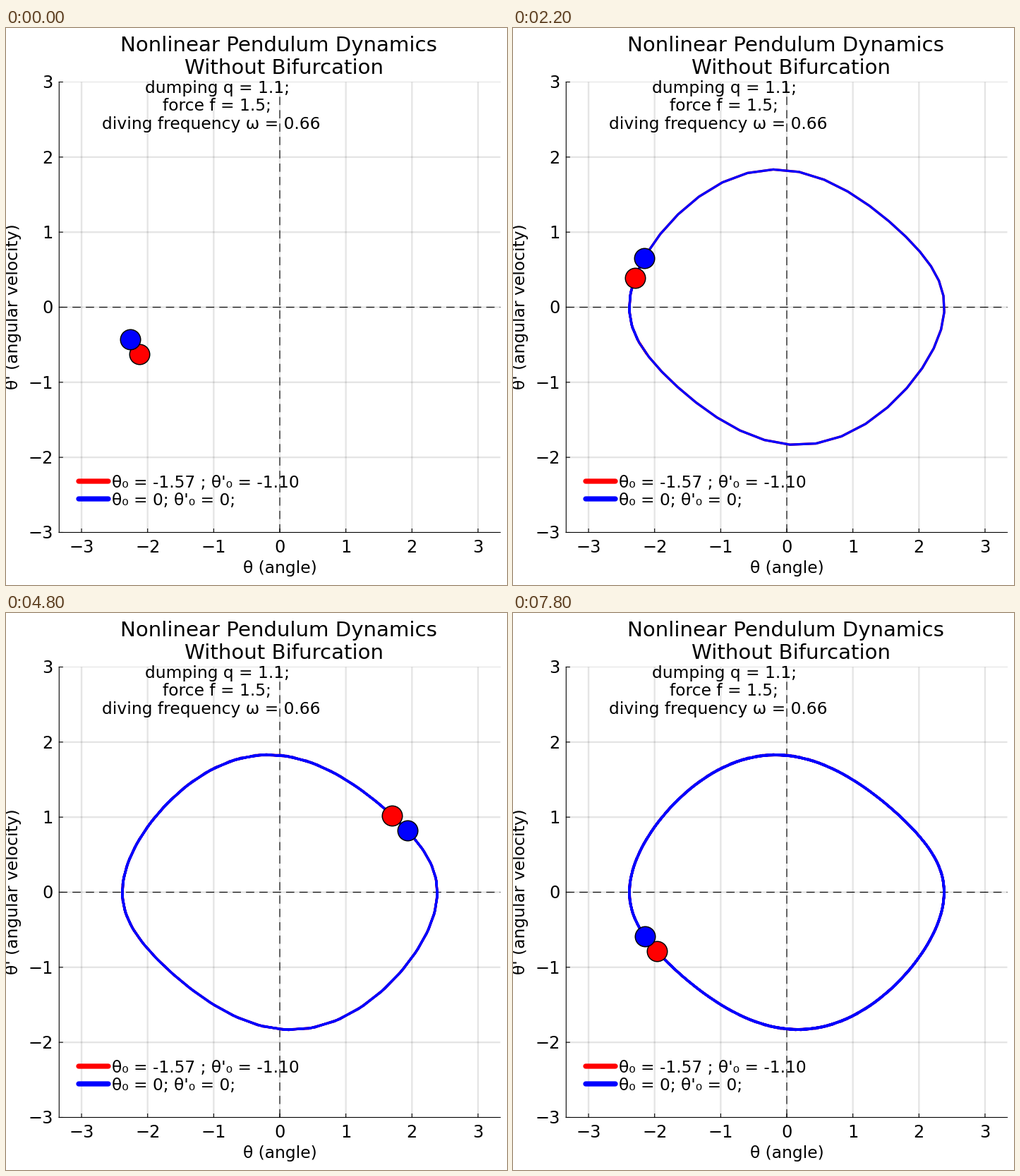
A matplotlib script for the animation above (8000 ms loop, 710x789 px).

```python
import numpy as np
import matplotlib.pyplot as plt
from matplotlib.animation import FuncAnimation

W, H, DPI = 710, 789, 100
PX = 72 / DPI
FRAMES, INTERVAL, STEPS = 40, 200, 4

# Driven damped pendulum
Q, F, OMEGA = 1.1, 1.5, 0.66
PERIOD = 2 * np.pi / OMEGA
N = 1000


def slope(t, s):
    return np.array([s[1], -s[1] / Q - np.sin(s[0]) + F * np.cos(OMEGA * t)])


def limit_cycle(laps=12):
    """One period of the settled motion, sampled at N + 1 times."""
    h = PERIOD / N
    s = np.array([-0.07, 1.83])
    path = []
    for k in range(laps * N + 1):
        if k >= (laps - 1) * N:
            path.append(s)
        t = k * h
        a = slope(t, s)
        b = slope(t + h / 2, s + h / 2 * a)
        c = slope(t + h / 2, s + h / 2 * b)
        d = slope(t + h, s + h * c)
        s = s + h / 6 * (a + 2 * b + 2 * c + d)
    path = np.array(path)
    path[:, 0] -= 2 * np.pi * np.round(path[:, 0].mean() / (2 * np.pi))
    return path


def warp(t):
    """Solver steps are shorter where the swing is fastest."""
    return -0.09 * np.sin(2 * OMEGA * (t + 0.09))


def px(theta):
    return 388 + 93.65 * np.asarray(theta)


def py(speed):
    return 395.5 - 106.33 * np.asarray(speed)


cycle = limit_cycle()
clock = np.linspace(0, PERIOD, N + 1)
start = clock[np.argmin(np.hypot(cycle[:, 0] + 2.12, cycle[:, 1] + 0.625))]
u = start + 0.2428 * np.arange(FRAMES * STEPS + 2)
times = (u + warp(u) - warp(start)) % PERIOD
xs = px(np.interp(times, clock, cycle[:, 0]))
ys = py(np.interp(times, clock, cycle[:, 1]))

plt.rcParams["font.family"] = "DejaVu Sans"
fig = plt.figure(figsize=(W / DPI, H / DPI), dpi=DPI, facecolor="white")
ax = fig.add_axes([0, 0, 1, 1])
ax.set_xlim(0, W)
ax.set_ylim(H, 0)
ax.axis("off")

LEFT, RIGHT, TOP, BOTTOM = 75.3, 700.5, 76.5, 714.5


def line(x, y, width, color="black", **kw):
    return ax.plot(x, y, color=color, lw=width * PX, snap=False, **kw)[0]


def label(x, y, text, size=23.4, ha="left", **kw):
    ax.text(x, y, text, fontsize=size * PX, ha=ha, va="baseline", zorder=6, **kw)


# Grid, ticks and tick labels
for n in range(-3, 4):
    x, y = px(n), py(n)
    name = str(n).replace("-", "\u2212")
    line([x, x], [TOP, BOTTOM], 2.4, alpha=0.1, solid_capstyle="butt")
    if abs(n) < 3:
        line([LEFT, RIGHT], [y, y], 2.4, alpha=0.1, solid_capstyle="butt")
    line([x, x], [BOTTOM, BOTTOM - 5], 1.1)
    line([LEFT, LEFT + 5], [y, y], 1.1)
    label(x, 743, name, 24, ha="center")
    label(66.5, y + 8.7, name, 24, ha="right")
line([LEFT, RIGHT], [TOP, TOP], 1.2, alpha=0.1)
line([LEFT, LEFT], [TOP, BOTTOM], 1.1)
line([LEFT, RIGHT], [BOTTOM, BOTTOM], 1.1)

# Dashed zero lines
dash = dict(dashes=(10.6, 6.6), dash_capstyle="butt")
line([LEFT, RIGHT], [395.5, 395.5], 1.1, **dash)
line([388, 388], [BOTTOM, TOP], 1.1, **dash)

# Captions
label(162.5, 33, "Nonlinear Pendulum Dynamics", 29.3)
label(253, 65, "Without Bifurcation", 29.3)
label(197, 91.5, "dumping q = 1.1;")
label(222, 117, "force f = 1.5;")
label(136, 142.5, "diving frequency \u03c9 = 0.66")
label(388, 772, "\u03b8 (angle)", ha="center")
label(17, 395, "\u03b8' (angular velocity)", ha="center",
      rotation=90, rotation_mode="anchor")

# Legend
for y, color, text in [
    (642, "red", "\u03b8\u2080 = -1.57 ; \u03b8'\u2080 = -1.10"),
    (667, "blue", "\u03b8\u2080 = 0; \u03b8'\u2080 = 0;"),
]:
    line([103, 145], [y, y], 7.3, color, solid_capstyle="round", zorder=6)
    label(150.5, y + 9, text)

# Trails and bobs; blue runs one step ahead of red
trails, bobs = [], []
for z, color in enumerate(["red", "blue"]):
    trails.append(line([], [], 3.3, color, zorder=3 + z / 10,
                       solid_capstyle="round"))
    bobs.append(line([], [], 1, color, zorder=4 + z / 10, marker="o",
                     ms=28.5 * PX, mec="black", mew=1.5 * PX))


def update(k):
    for lead, (trail, bob) in enumerate(zip(trails, bobs)):
        end = lead + STEPS * k
        trail.set_data(xs[lead:end + 1], ys[lead:end + 1])
        bob.set_data(xs[end:end + 1], ys[end:end + 1])
    return trails + bobs


anim = FuncAnimation(fig, update, frames=FRAMES, interval=INTERVAL, repeat=True)
plt.show()
```
